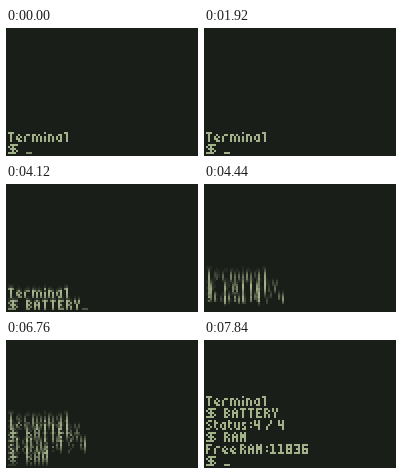
Animation, 192 px wide and 128 px high, one loop 8 s. Source, as an HTML page with a canvas:

```html
<!DOCTYPE html>
<html lang="en">
<head>
<meta charset="utf-8">
<title>Terminal</title>
<style>
  html, body { margin: 0; width: 100%; height: 100%; overflow: hidden; background: #1a1e18; }
  canvas { display: block; width: 100vw; height: 100vh; image-rendering: pixelated; }
</style>
</head>
<body>
<canvas id="screen" width="192" height="128"></canvas>
<script>
const W = 96, H = 64, LOOP = 8000;
const TICK = 1000 / 72;      // LCD refresh
const RESPONSE = 185;        // ms for a pixel to go fully on or off
const BLINK = 312;
const LEAD = 400;            // settling time simulated before the loop
const ROW_TIME = 36;         // ms per scrolled pixel row
const LINE = 6, BOTTOM = 58;
const PROMPT = '$   ';
const DARK = [26, 30, 24], LIGHT = [164, 178, 139];

const GLYPHS = {
  ' ': '',
  '$': '.#### #.#.. .###. ..#.# ####.',
  ':': '.. .# .. .# ..',
  '/': '...#. ...#. ..#.. .#... .#...',
  '1': '##. .#. .#. .#. ###',
  '3': '### ..# .## ..# ###',
  '4': '#.# #.# ### ..# ..#',
  '6': '### #.. ### #.# ###',
  '8': '### #.# ### #.# ###',
  A: '.#. #.# ### #.# #.#',
  B: '##. #.# ##. #.# ##.',
  E: '### #.. ##. #.. ###',
  F: '### #.. ##. #.. #..',
  M: '#.# ### ### #.# #.#',
  R: '##. #.# ##. #.# #.#',
  S: '.## #.. .#. ..# ##.',
  T: '### .#. .#. .#. .#.',
  Y: '#.# #.# .#. .#. .#.',
  a: '... .## #.# #.# .##',
  e: '... .#. #.# ##. .##',
  i: '# . # # #',
  l: '## .# .# .# .#',
  m: '..... ##.#. #.#.# #.#.# #.#.#',
  n: '... ##. #.# #.# #.#',
  r: '... .## #.. #.. #..',
  s: '.. ## #. .# ##',
  t: '#. ## #. #. .#',
  u: '... #.# #.# #.# .##'
};
for (const key in GLYPHS) GLYPHS[key] = GLYPHS[key].split(' ');

// Each session: typed command, key times, Enter, first scrolled row, reply.
const sessions = [
  { word: 'BATTERY', keys: [2215, 2420, 2615, 2815, 3015, 3214, 3830],
    enter: 4010, scroll: 4070, reply: 'Status:4 / 4' },
  { word: 'RAM', keys: [5687, 5975, 6230],
    enter: 6515, scroll: 6603, reply: 'Free RAM:11836' }
];

const ctx = document.getElementById('screen').getContext('2d');
const image = ctx.createImageData(W * 2, H * 2);
const goal = new Uint8Array(W * H);
const level = new Float32Array(W * H);
let tick = -1;

function plot(x, y) {
  if (x >= 0 && x < W && y >= 0 && y < H) goal[y * W + x] = 1;
}

function drawText(text, x, y) {
  for (const char of text) {
    const rows = GLYPHS[char];
    rows.forEach((row, dy) => [...row].forEach((dot, dx) => {
      if (dot === '#') plot(x + dx, y + dy);
    }));
    x += rows[0].length + 1;
  }
  return x;
}

function drawGoal(t) {
  goal.fill(0);
  const lines = ['Terminal', PROMPT];
  let scrolled = 0, cursorStart = -138, cursorHidden = false;

  for (const { word, keys, enter, scroll, reply } of sessions) {
    const typed = keys.filter(time => time <= t);
    const printed = scroll + LINE * ROW_TIME;
    const ready = printed + LINE * ROW_TIME;
    lines[lines.length - 1] += word.slice(0, typed.length);
    if (typed.length) cursorStart = typed[typed.length - 1];
    if (t >= enter) cursorHidden = t < ready;
    if (t >= ready) cursorStart = ready;
    if (t < scroll) break;
    // A line is printed only after the screen has made room for it.
    if (t >= printed) lines.push(reply);
    if (t >= ready) lines.push(PROMPT);
    scrolled += Math.min(2 * LINE, 1 + Math.floor((t - scroll) / ROW_TIME));
    if (t < ready) break;
  }

  const top = BOTTOM - LINE - scrolled;
  let end = 0;
  lines.forEach((text, i) => { end = drawText(text, 1, top + i * LINE); });

  const lit = Math.floor((t - cursorStart) / BLINK) % 2 === 0;
  if (lit && !cursorHidden) {
    for (let dx = 0; dx < 3; dx++) plot(end + dx, BOTTOM + 4);
  }
}

function advanceTo(t) {
  const last = Math.floor((t + LEAD) / TICK);
  if (last < tick || tick < 0) {
    drawGoal(-LEAD);
    level.set(goal);
    tick = 0;
  }
  const step = TICK / RESPONSE;
  while (tick < last) {
    drawGoal(++tick * TICK - LEAD);
    for (let i = 0; i < level.length; i++) {
      level[i] = goal[i] ? Math.min(1, level[i] + step) : Math.max(0, level[i] - step);
    }
  }
}

function paint() {
  const data = image.data;
  for (let y = 0, p = 0; y < H * 2; y++) {
    for (let x = 0; x < W * 2; x++, p += 4) {
      const v = level[(y >> 1) * W + (x >> 1)];
      for (let c = 0; c < 3; c++) data[p + c] = DARK[c] + (LIGHT[c] - DARK[c]) * v;
      data[p + 3] = 255;
    }
  }
  ctx.putImageData(image, 0, 0);
}

const start = performance.now();
function frame() {
  advanceTo((performance.now() - start) % LOOP);
  paint();
  requestAnimationFrame(frame);
}
frame();
</script>
</body>
</html>
```
